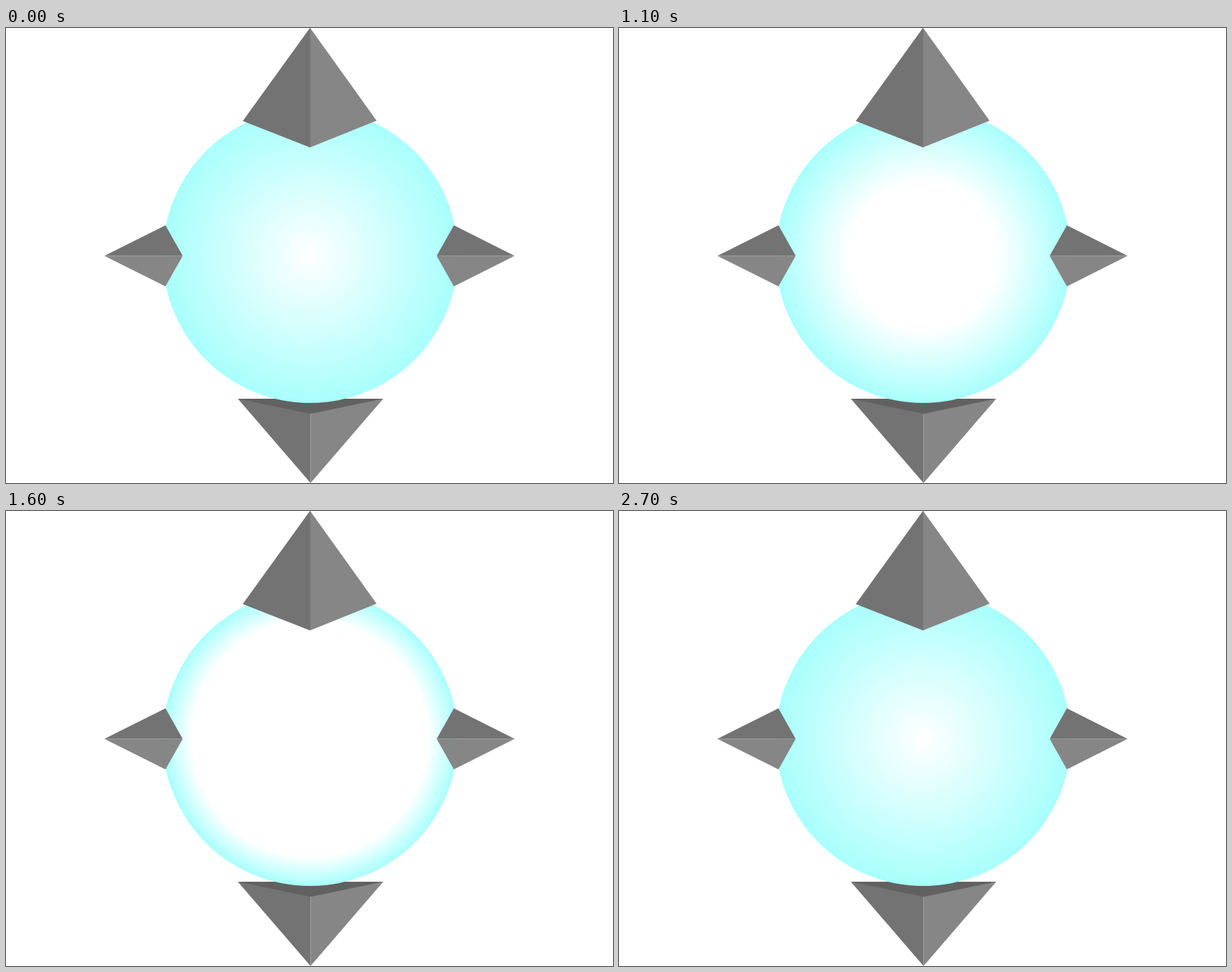
An HTML page for the animation above (3000 ms loop, 864 px wide and 648 px high).

```html
<!DOCTYPE html>
<html lang="en">
<head>
<meta charset="utf-8">
<title>Glowing orb</title>
<style>
  html, body { margin: 0; width: 100%; height: 100%; overflow: hidden; background: #fff; }
  svg { display: block; width: 864px; height: 648px; }
  .lit { fill: #868686; }
  .dim { fill: #737373; }
  .deep { fill: #616161; }
</style>
</head>
<body>
<svg viewBox="0 0 864 648">
  <defs>
    <radialGradient id="glow" gradientUnits="userSpaceOnUse" cx="433" cy="324" r="210">
      <stop id="core" offset="0" stop-color="#fff"/>
      <stop offset="1" stop-color="#a8fffc"/>
    </radialGradient>
  </defs>

  <g id="bottom">
    <path class="dim" d="M330 528H433.5V648Z"/>
    <path class="lit" d="M433.5 528H537L433.5 648Z"/>
    <path class="deep" d="M330 528H537L433.5 549.5Z"/>
  </g>

  <circle cx="433" cy="324" r="210" fill="url(#glow)"/>

  <g id="top">
    <path class="dim" d="M432.5 0L337 132.5L432.5 170H433V0Z"/>
    <path class="lit" d="M433 0L527.5 132L433 170Z"/>
  </g>
  <g id="left">
    <path class="dim" d="M140 324.5L227 281L251.5 324.5Z"/>
    <path class="lit" d="M140 324.5H251.5L227 368Z"/>
  </g>
  <g id="right">
    <path class="dim" d="M724 324.5L637.5 281L613 324.5Z"/>
    <path class="lit" d="M724 324.5H613L637.5 368Z"/>
  </g>
</svg>
<script>
  const LOOP = 3000;
  // Start of each brightening step; the fade back mirrors it.
  const starts = [0, 300, 500, 700, 900, 1100, 1200, 1300, 1400, 1500];
  const MIDDLE = 1550;
  const core = document.getElementById('core');
  const origin = performance.now();
  let shown = 0;

  function levelAt(t) {
    if (t < MIDDLE) return starts.findLastIndex(s => t >= s);
    // Mirrored steps end where the rising ones begin.
    const back = 2 * MIDDLE - t;
    return Math.max(0, starts.findLastIndex(s => s < back && (s > 0 || back > 0)));
  }

  // The last three fading steps hold 200 ms, the dimmest 300 ms.
  const falls = [1600, 1700, 1800, 1900, 2000, 2100, 2300, 2500, 2700];

  function stepAt(t) {
    return t < falls[0] ? levelAt(t) : 8 - falls.findLastIndex(f => t >= f);
  }

  function draw(now) {
    const level = stepAt(Math.max(0, now - origin) % LOOP);
    if (level !== shown) {
      core.setAttribute('offset', level / 10);
      shown = level;
    }
    requestAnimationFrame(draw);
  }
  requestAnimationFrame(draw);
</script>
</body>
</html>
```
